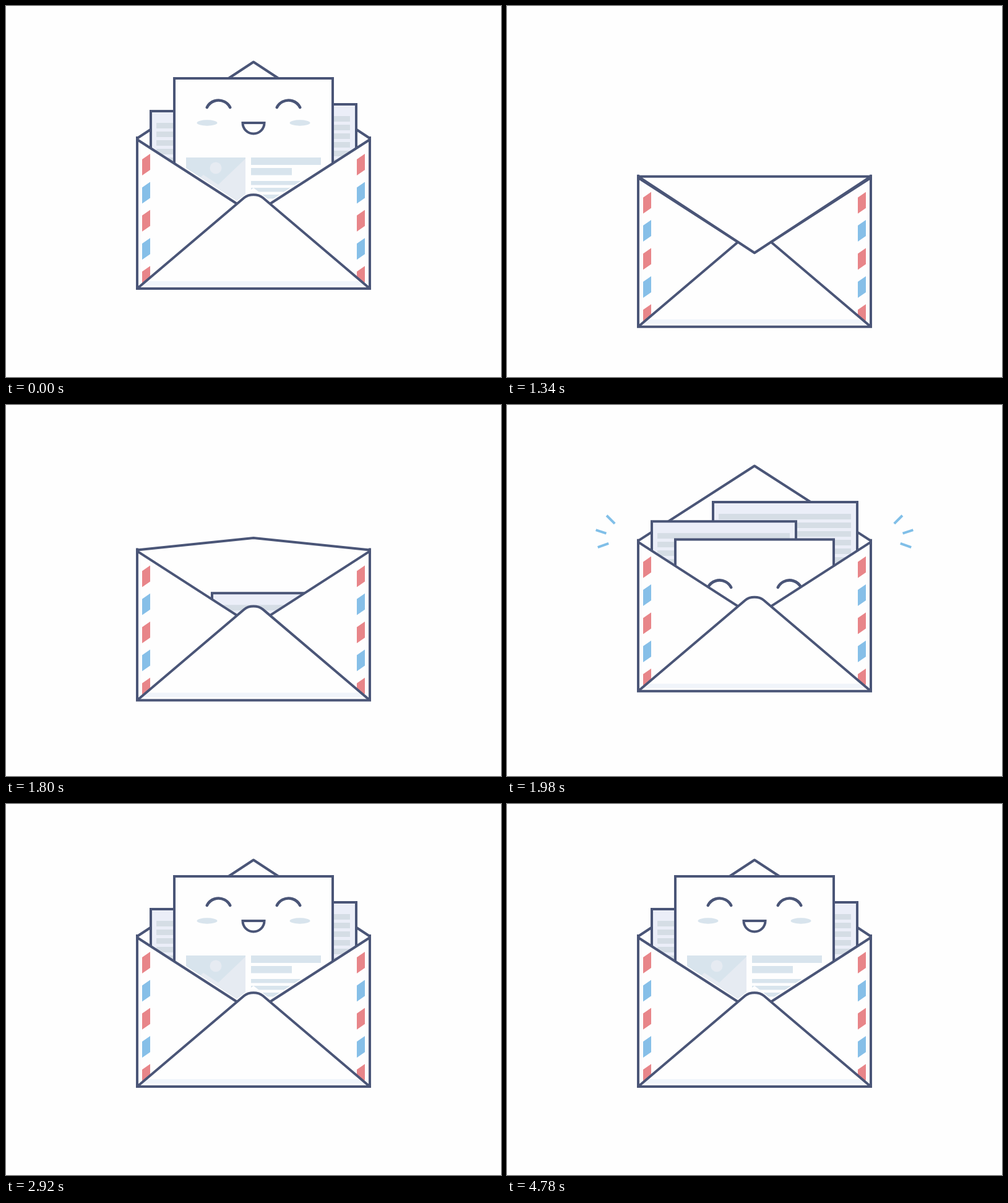
Recreate the animation shown at these times as an HTML page with a canvas. Size 800 by 600 pixels, loop 4800 ms.

```html
<!DOCTYPE html>
<html>
<head>
<meta charset="utf-8">
<style>
  html, body { margin: 0; width: 100%; height: 100%; overflow: hidden; background: #fefefe; }
  canvas { display: block; }
</style>
</head>
<body>
<canvas id="stage" width="800" height="600"></canvas>
<script>
const c = document.getElementById('stage').getContext('2d');
const LOOP = 4800, CLOSE = 1000, RISE = 1495, OUT = 2365;
const INK = '#4a5577', WHITE = '#fefefe', RED = '#e88589', BLUE = '#86bfe8';
const SHEET = '#ebeef8', BAR = '#d5dde5', TINT = '#d8e4ed', PALE = '#e6ebf2';

const span = (t, start, length) => Math.min(1, Math.max(0, (t - start) / length));
const sineInOut = u => (1 - Math.cos(Math.PI * u)) / 2;
const cubicOut = u => 1 - (1 - u) ** 3;
const backOut = u => 1 + 2.70158 * (u - 1) ** 3 + 1.70158 * (u - 1) ** 2;

const drop = t => 82 * (t < RISE
  ? sineInOut(span(t, CLOSE, 510))
  : 1 - cubicOut(span(t, RISE, 825)));
const squash = t => 1 - .0175 * Math.sin(Math.PI * span(t, 1420, 340));
// Height of the flap: positive hangs down in front, negative stands up behind.
const flapHeight = t => 123.5 * (t < RISE
  ? 2 * sineInOut(span(t, 1060, 270)) - 1
  : 1 - 2 * sineInOut(span(t, 1545, 465)));
// How far a part is sunk into the envelope: 0 is out, 1 is hidden.
const sunk = (t, start) => t < RISE
  ? 1 - backOut(1 - span(t, CLOSE, 270))
  : 1 - backOut(span(t, start, OUT - start));

function path(points, close) {
  c.beginPath();
  points.forEach(([x, y]) => c.lineTo(x, y));
  if (close) c.closePath();
}
function fill(color) { c.fillStyle = color; c.fill(); }
function stroke(color = INK, width = 4) {
  c.strokeStyle = color;
  c.lineWidth = width;
  c.stroke();
}
function bar(x, y, w, h, color) {
  c.fillStyle = color;
  c.fillRect(x, y, w, h);
}
function sheet(x, y, w, color) {
  c.beginPath();
  c.rect(x, y, w, 470 - y);
  fill(color);
  stroke();
}
function lined(x, y) {
  sheet(x, y, 233, SHEET);
  for (let i = 0; i < 8; i++) bar(x + 9, y + 19 + i * 14, 214, 9, BAR);
}
function bothSides(draw) {
  draw();
  c.save();
  c.translate(800, 0);
  c.scale(-1, 1);
  draw();
  c.restore();
}

function article(dy) {
  c.save();
  c.translate(0, dy);
  path([[280, 240], [280, 255], [373, 315], [400, 294], [427, 315], [520, 255], [520, 240]]);
  c.clip();
  bar(291, 245, 96, 72, TINT);
  path([[291, 298], [319, 273], [343, 289], [387, 247], [387, 320], [291, 320]]);
  fill(PALE);
  c.beginPath();
  c.arc(339, 262, 9.5, 0, 7);
  fill(PALE);
  bar(396, 245, 113, 12, TINT);
  bar(396, 262, 66, 11.5, TINT);
  for (let i = 0; i < 3; i++) bar(396, 283 + i * 11, 113, 6.5, TINT);
  c.restore();
}

function face(eyeY, mouthY) {
  bothSides(() => {
    c.lineCap = 'round';
    c.beginPath();
    c.arc(343.5, 173.5 + eyeY, 21, Math.PI + .47, -.47);
    stroke(INK, 4.6);
    c.lineCap = 'butt';
    c.beginPath();
    c.ellipse(325, 189 + mouthY, 16.5, 4.7, 0, 0, 7);
    fill(TINT);
  });
  c.beginPath();
  c.arc(400, 189 + mouthY, 17.5, 0, Math.PI);
  c.closePath();
  fill(WHITE);
  stroke();
}

function papers(t) {
  c.save();
  c.beginPath();
  c.rect(212, 0, 376, 455);
  c.clip();
  lined(333, 159 + 243 * sunk(t, 1722));
  lined(234, 170 + 232 * sunk(t, 1795));
  const dy = 285 * sunk(t, 1894);
  sheet(272, 117 + dy, 256, WHITE);
  article(dy);
  face(285 * sunk(t, 1915), 285 * sunk(t, 1925));
  c.restore();
}

function bottomFlap() {
  c.beginPath();
  c.moveTo(212, 457);
  c.lineTo(385, 310);
  c.bezierCurveTo(393, 303.5, 407, 303.5, 415, 310);
  c.lineTo(588, 457);
}

function front() {
  path([[212, 216], [400, 337], [588, 216], [588, 457], [212, 457]]);
  fill(WHITE);
  for (const x of [220, 567]) {
    for (let i = 0; i < 5; i++) {
      const y = 239 + i * 45.4;
      path([[x, y + 9], [x + 13, y], [x + 13, y + 26], [x, y + 35]]);
      fill(i % 2 ? BLUE : RED);
    }
  }
  bothSides(() => {
    path([[212, 216], [375, 321]]);
    stroke();
  });
  bottomFlap();
  fill(WHITE);
  c.save();
  c.clip();
  bar(212, 445, 376, 7, '#f0f4fa');
  c.restore();
  bottomFlap();
  stroke();
  path([[212, 211], [212, 457], [588, 457], [588, 211]]);
  stroke();
}

function flap(h) {
  path([[212, 214], [400, 214 + h], [588, 214]], h > 0);
  fill(WHITE);
  c.lineJoin = 'round';
  stroke();
  c.lineJoin = 'miter';
}

// Each ray shoots outwards; its tail follows at a steady pace and catches up.
function rays(t) {
  for (const [x, y, angle, life] of [[162, 174, 225, 480], [142, 196, 198, 550], [148, 224, 160, 480]]) {
    const u = span(t, 1820, life);
    if (u === 0 || u === 1) continue;
    const at = d => {
      const r = 50 * d - 34, a = angle * Math.PI / 180;
      return [x + r * Math.cos(a), y + r * Math.sin(a)];
    };
    bothSides(() => {
      path([at(u), at(cubicOut(u))]);
      stroke('#80bfe8');
    });
  }
}

function draw(t) {
  bar(0, 0, 800, 600, WHITE);
  c.save();
  c.translate(0, drop(t));
  rays(t);
  c.translate(0, 457);
  c.scale(1, squash(t));
  c.translate(0, -457);
  const h = flapHeight(t);
  if (h <= 0) flap(h);
  papers(t);
  front();
  if (h > 0) flap(h);
  c.restore();
}

const began = performance.now();
function tick() {
  draw((performance.now() - began) % LOOP);
  requestAnimationFrame(tick);
}
tick();
</script>
</body>
</html>
```
